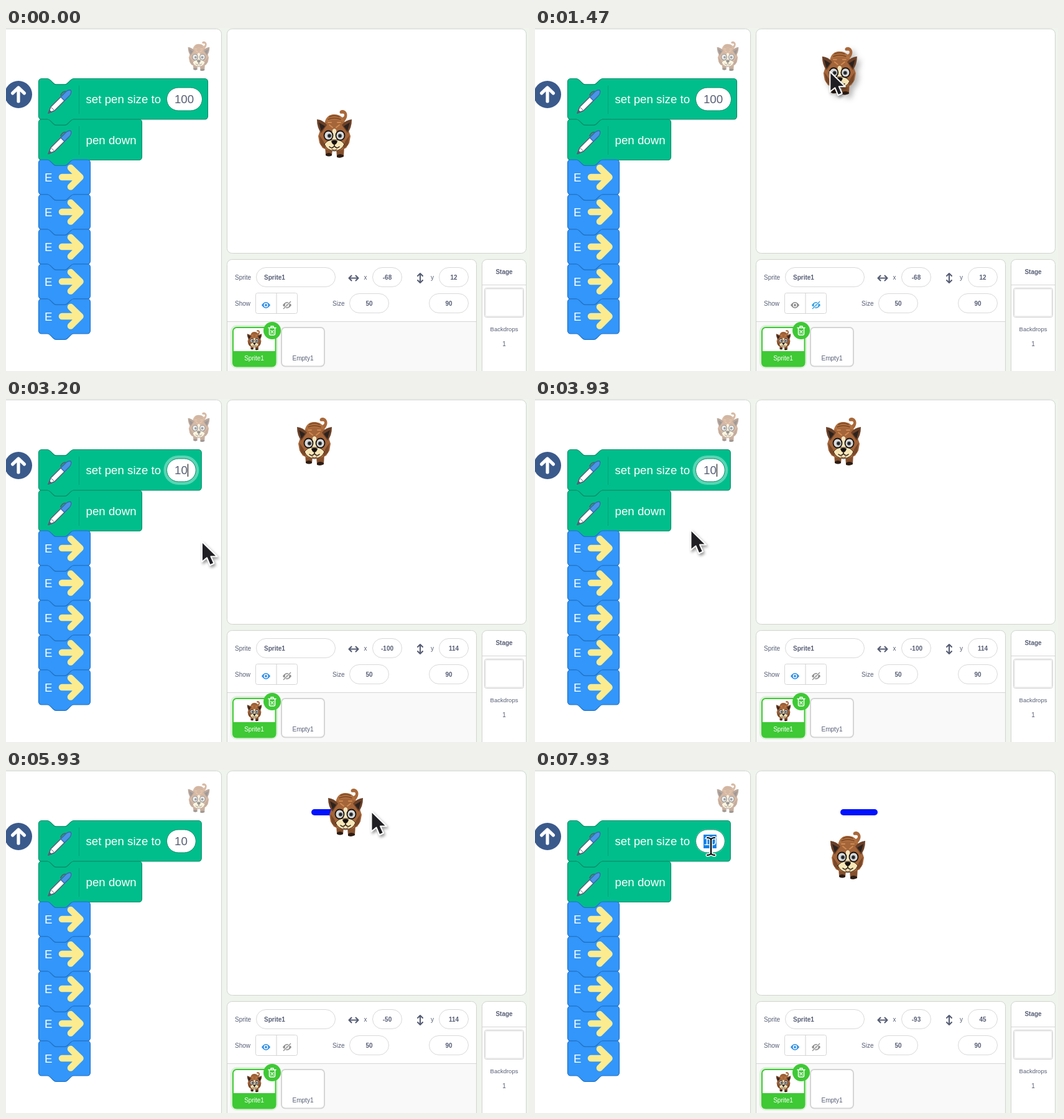
Write an HTML page that moves like this. It is 841 px wide and 552 px high and loops after 8000 ms.

```html
<!DOCTYPE html>
<html lang="en">
<head>
<meta charset="utf-8">
<title>Pen blocks</title>
<style>
  html, body { margin: 0; width: 100%; height: 100%; overflow: hidden; background: #eff4ec; }
  svg { display: block; width: 841px; height: 552px; font-family: "Liberation Sans", Arial, sans-serif; }
  .dragged { filter: drop-shadow(5px 5px 5px rgba(0, 0, 0, .3)); }
  .shade { filter: drop-shadow(2px 3px 2px rgba(0, 0, 0, .4)); }
</style>
</head>
<body>
<svg id="scene" viewBox="0 0 841 552" xmlns="http://www.w3.org/2000/svg"></svg>
<script>
const LOOP = 8000, TICK = 1000 / 15, S = 1.17;
const GREEN = ['#00be8c', '#0b8e69'], BLUE = ['#3296fa', '#2371c2'];
const INK = '#575e75';

// Cursor path: time, x, y
const cursorPath = [
  [130, 176, 14], [270, 290, 60], [400, 430, 135], [530, 512, 171], [670, 512, 171],
  [930, 441, 97], [1000, 433, 87], [1200, 446, 73], [1530, 480, 69], [1800, 480, 69],
  [1930, 317, 115], [2070, 306, 116], [2200, 292, 113], [2600, 292, 113],
  [2930, 331, 185], [3130, 326, 222], [3270, 303, 236], [3400, 300, 238],
  [3730, 272, 230], [3930, 250, 210], [4130, 196, 150], [4270, 190, 140], [4400, 188, 122],
  [4800, 188, 118], [5070, 175, 118], [5270, 176, 117], [5530, 400, 95], [5800, 608, 77],
  [5930, 587, 66], [6000, 587, 66], [6130, 544, 57], [6270, 543, 59], [6530, 521, 104],
  [6800, 506, 126], [7000, 501, 126], [7200, 501, 126], [7330, 411, 130],
  [7470, 330, 131], [7530, 281, 126], [7670, 280, 120], [7730, 283, 115], [7870, 283, 123]
];

const rect = (x, y, w, h, r, fill, stroke = 'none', more = '') =>
  `<rect x="${x}" y="${y}" width="${w}" height="${h}" rx="${r}" fill="${fill}" stroke="${stroke}" ${more}/>`;
const path = (d, fill = 'none', stroke = 'none', w = 1, more = '') =>
  `<path d="${d}" fill="${fill}" stroke="${stroke}" stroke-width="${w}" ${more}/>`;
const text = (x, y, s, size = 10, fill = INK, more = '') =>
  `<text x="${x}" y="${y}" font-size="${size}" fill="${fill}" ${more}>${s}</text>`;
const MID = 'text-anchor="middle"', BOLD = MID + ' font-weight="bold"';
const ROUND = 'stroke-linecap="round" stroke-linejoin="round"';

function blockShape(w, h) {
  w /= S; h /= S;
  return `M0 4A4 4 0 0 1 4 0H12c2 0 3 1 4 2l4 4c1 1 2 2 4 2h12c2 0 3-1 4-2l4-4c1-1 2-2 4-2
    H${w - 4}a4 4 0 0 1 4 4V${h - 4}a4 4 0 0 1-4 4H48c-2 0-3 1-4 2l-4 4c-1 1-2 2-4 2H24
    c-2 0-3-1-4-2l-4-4c-1-1-2-2-4-2H4a4 4 0 0 1-4-4Z`;
}

const block = (y, w, h, [fill, edge], id = '') =>
  `<path ${id} transform="translate(52.5 ${y}) scale(${S})" d="${blockShape(w, h)}" fill="${fill}" stroke="${edge}"/>`;

const penIcon = y => `<g transform="translate(67 ${y})" ${ROUND}>
  ${path('M21 9Q25 1 31 4M24 10l5-5', 'none', INK, 1.8)}
  ${path('M1 38L5 28L28 5L34 11L11 34Z', '#fff', INK, 1.5)}
  ${path('M21 12L30 3Q34 0 37 1Q39 4 36 9L27 18Z', '#4a94e8', '#3a6aa8', 1.4)}
  ${path('M1 38L3 33L6 36Z', INK, INK)}
  ${path('M6 29L10 33', 'none', INK, 1)}</g>`;

const penBlock = (y, w, label, id) => block(y, w, 65.5, GREEN, id) + penIcon(y + 17.5) +
  path(`M117.5 ${y + 11}v46`, 'none', '#06a67c', 1.2) + text(128.5, y + 39.5, label, 18.72, '#fff');

const stepBlock = y => block(y, 83, 56, BLUE) + text(62, y + 35, 'E', 18.72, '#fff') +
  path(`M90 ${y + 28}H119M104 ${y + 13}L119.5 ${y + 28}L104 ${y + 43.5}`, 'none', '#fcec8f', 10.5, ROUND);

const dog = `<g id="dog" stroke="#1c130d" stroke-width="1.8" ${ROUND}>
  ${path('M4-26C9-25 16-25 16-30C16-34 11-31 9-33C7-37 13-40 18-36C23-31 20-22 14-18Z', '#a9683a')}
  ${path('M-16-15C-14-29-6-31 0-31C9-31 16-26 18-14Z', '#b0703f')}
  ${path('M-8-27Q0-31 8-27M-10-23Q0-27 10-23', 'none', '#7a4525', 1.4)}
  ${path('M-15 20L-14 34Q-10 38-4 35L-3 24H3L4 37Q9 41 15 36L16 20Z', '#85502d')}
  ${path('M-14 33Q-9 29-4 33V35Q-9 38-14 35ZM4 35Q9 31 15 35V37Q9 40 4 38Z', '#2b1c14')}
  ${path('M-22-8C-16-20-8-22 0-22C9-22 17-20 22-8L26 4L24 15L19 23Q0 33-19 23L-24 15L-26 4Z', '#a4653a')}
  ${path('M-24 3L-22 18L-14 25L-17 13ZM24 3L22 18L14 25L17 13Z', '#794828', 'none')}
  ${path('M-28-23Q-18-22-12-14L-21-1Q-28-9-28-23Z', '#6b4027')}
  ${path('M28-23Q18-22 12-14L21-1Q28-9 28-23Z', '#6b4027')}
  ${path('M-25-18L-15-12L-21-4ZM25-18L15-12L21-4Z', '#2c221e', 'none')}
  ${path('M-8-14L-3-10M8-14L3-10M-10-18H-5M10-18H5', 'none', '#d08a50', 2)}
  ${path('M-3-6Q0-10 3-6L5 12H-5Z', '#f5e4bb', 'none')}
  ${path('M-16 17Q-11 9 0 10Q11 9 16 17Q12 27 0 28Q-12 27-16 17Z', '#f7e7b8', '#40291b', 1)}
  <ellipse cx="-9.5" cy="3" rx="7" ry="7.5" fill="#d9dcde"/>
  <ellipse cx="9.5" cy="3" rx="7" ry="7.5" fill="#d9dcde"/>
  <circle cx="-8" cy="3.5" r="3" fill="#202428" stroke="#777" stroke-width="1"/>
  <circle cx="9" cy="3.5" r="3" fill="#202428" stroke="#777" stroke-width="1"/>
  ${path('M-5 12Q0 9 5 12Q4 17 0 18Q-4 17-5 12Z', '#17110f')}
  ${path('M0 17V20M-8 21Q-4 25 0 20Q4 25 8 21', 'none', '#2b1c14', 1.5)}
  ${path('M-4 25Q0 28 4 25', 'none', '#7a4a35', 1.2)}</g>`;

const pill = (x, y, w, value, id = '') => rect(x + .5, y + .5, w - 1, 31, 15.5, '#fff', '#d9d9d9') +
  (value === null ? '' : text(x + w / 2, y + 20, value, 10, INK, BOLD + id));

const eye = (id, x, slash) => `<g id="${id}" transform="translate(${x} 446)">
  ${path('M-7 0Q0-10 7 0Q0 10-7 0Z', 'currentColor')}<circle r="3.4" fill="#fff"/><circle r="1.9" fill="currentColor"/>
  ${slash ? path('M-6 6L6-6', 'none', '#fff', 3) + path('M-6 6L6-6', 'none', 'currentColor', 1.3) : ''}</g>`;

const swapArrow = (x, y, turn) => `<g transform="translate(${x} ${y}) rotate(${turn})">
  ${path('M-7 0H7M-3.5-4L-7.5 0L-3.5 4M3.5-4L7.5 0L3.5 4', 'none', INK, 2.1, ROUND)}</g>`;

function scene() {
  const EDGE = '#cfd5cf';
  return `<defs>${dog}</defs>` + rect(0, 0, 841, 552, 0, '#eff4ec') +
    // code area
    rect(-20, 1.5, 366.5, 580, 8, '#fff', EDGE) +
    '<use href="#dog" transform="translate(310 45) scale(.62)" opacity=".45"/>' +
    '<circle cx="20" cy="107" r="22" fill="#3b5a8c"/>' +
    path('M20 118V97M10.500 105L20 96L29.500 105', 'none', '#fff', 5.2, ROUND) +
    penBlock(81.5, 272, 'set pen size to', 'id="sizeBlock"') +
    rect(258, 96, 57, 37, 18.5, '#fff', 'none', 'id="ring" fill-opacity=".35"') +
    rect(258.5, 96, 57, 37, 18.6, '#fff', '#0b8e69', 'id="field"') +
    rect(271, 104, 31, 22, 0, '#0f80e8', 'none', 'id="mark"') +
    text(286.5, 121, '', 18.72, INK, MID + ' id="size"') +
    path('M292.500 104.500V125', 'none', '#222', 1.2, 'id="caret"') +
    penBlock(147, 166, 'pen down', '') +
    [0, 1, 2, 3, 4].map(i => stepBlock(212 + 56 * i)).join('') +
    // stage
    rect(355.500, 1.5, 481, 361, 8, '#fff', EDGE) +
    path('', 'none', '#0012ff', 10, 'id="trail" stroke-linecap="round"') +
    '<g id="actor"><use href="#dog"/></g>' +
    // sprite details
    rect(355.500, 372.500, 401, 220, 8, '#fff', EDGE) +
    rect(356, 473, 400, 90, 0, '#f9f9f9') + path('M356 472.500H756', 'none', '#d6d6d6') +
    text(368, 405, 'Sprite') + pill(402, 385, 128, null) +
    text(415, 405, 'Sprite1', 10, INK, 'font-weight="bold"') +
    swapArrow(559, 402.5, 0) + text(575.500, 405, 'x') + pill(589, 385, 48, '', ' id="xValue"') +
    swapArrow(666, 402.5, 90) + text(683, 405, 'y') + pill(696, 385, 48, '', ' id="yValue"') +
    text(368, 447, 'Show') + rect(401.5, 426.5, 67, 33, 3, '#fff', '#d6d6d6') +
    path('M435 426.500V459.500', 'none', '#d0d0d0') + eye('shown', 418, false) + eye('hidden', 452, true) +
    text(525, 447, 'Size') + pill(552, 427, 64, '50') + pill(680, 427, 64, '90') +
    // sprite cards
    rect(361, 478, 76, 70, 10, '#dcefd8') + rect(365, 482, 68.500, 62.500, 6, '#fff', '#3ec935', 'stroke-width="2"') +
    path('M364.500 520H434V539Q434 545 428 545H370Q364.500 545 364.500 539Z', '#3ec935') +
    '<use href="#dog" transform="translate(399.500 502) scale(.42)"/>' + text(399, 535, 'Sprite1', 10, '#fff', MID) +
    rect(443, 482, 69, 62.500, 6, '#fff', '#d5d5d5', 'stroke-width="2"') + text(477.5, 535, 'Empty1', 10, INK, MID) +
    '<circle cx="428" cy="487" r="14" fill="#3ec935"/>' +
    path('M422 482.500H434M426 482V480H430V482M423.500 483.500V492Q423.500 494 425.500 494H430.500Q432.500 494 432.500 492V483.500M426 487l4 4m0-4l-4 4',
      'none', '#fff', 1.5, ROUND) +
    // backdrop panel
    rect(765.500, 372.500, 71, 220, 8, '#fff', EDGE) + path('M766 413.500H836', 'none', '#d6d6d6') +
    text(801, 396, 'Stage', 10, INK, BOLD) + rect(769.5, 418.5, 63, 47, 3, '#fff', '#d2d2d2') +
    rect(771, 420, 60, 44, 2, 'none', '#eee', 'stroke-width="2"') +
    text(801, 488, 'Backdrops', 9.5, INK, MID) + text(801, 512, '1', 10, INK, MID) +
    // pointers
    `<g id="arrow" class="shade">${path('M0.500 0.500V33L8.500 26.500L13.500 38.500L20 35.500L15 24.500H25Z', '#202024', '#fff', 2, ROUND)}</g>
    <g id="beam">${['#fff', '#000'].map((c, i) => path('M-6-14Q-1-14 0-11Q1-14 6-14M0-11V11M-6 14Q-1 14 0 11Q1 14 6 14',
      'none', c, i ? 2.2 : 5, ROUND)).join('')}</g>`;
}

document.getElementById('scene').innerHTML = scene();
const el = {};
document.querySelectorAll('#scene [id]').forEach(n => el[n.id] = n);

const clamp = v => Math.max(0, Math.min(1, v));
const ease = v => v * v * (3 - 2 * v);
const move = (node, x, y) => node.setAttribute('transform', `translate(${x} ${y})`);
const show = (node, on) => node.setAttribute('visibility', on ? 'visible' : 'hidden');
const within = (t, a, b) => t >= a && t < b;

function along(points, t) {
  const i = points.findIndex(p => p[0] > t);
  if (i < 0) return points[points.length - 1].slice(1);
  if (i === 0) return points[0].slice(1);
  const [ta, xa, ya] = points[i - 1], [tb, xb, yb] = points[i];
  const k = (t - ta) / (tb - ta);
  return [xa + (xb - xa) * k, ya + (yb - ya) * k];
}

// Sprite position in stage units, with y upwards
function restPosition(t) {
  if (t < 1730) return [-68, 12];
  if (t < 7200) return [-100 + 10 * Math.max(0, Math.min(5, Math.floor((t - 5130) / 66))), 114];
  return [-93, 45];
}

function render(time) {
  const t = Math.round(Math.floor((time + 5) / TICK) * TICK / 10) * 10;
  const [cx, cy] = along(cursorPath, t);

  const firstDrag = within(t, 730, 1730), dragging = firstDrag || within(t, 6270, 7200);
  const [px, py] = restPosition(t);
  const x = dragging ? cx + (firstDrag ? 16 : 2) : 596 + px;
  const y = dragging ? cy + (firstDrag ? -1 : 11) : 182 - py;
  move(el.actor, x, y);
  el.actor.setAttribute('class', dragging ? 'dragged' : '');
  const shownX = within(t, 6270, 7200) ? -50 : px;
  el.xValue.textContent = shownX;
  el.yValue.textContent = py;
  el.shown.setAttribute('color', dragging ? '#8a8a8a' : '#2e8de8');
  el.hidden.setAttribute('color', dragging ? '#2e9be0' : '#8a8a8a');

  show(el.trail, t >= 5130);
  el.trail.setAttribute('d', `M496 68H${t < 6270 ? 596 + px : 546}`);

  const value = t < 2670 ? '100' : t < 2800 ? '1' : '10';
  const width = value === '100' ? 57 : 46.8, mid = 258.5 + width / 2;
  const selected = within(t, 2470, 2670) || t >= 7870;
  const focusAt = t >= 7870 ? 7870 : 2470;
  const focused = within(t, 2470, 5070) || t >= 7870;
  const grow = focused ? 5 * ease(clamp((t - focusAt) / 220)) : 0;
  el.sizeBlock.setAttribute('d', blockShape(215 + width, 65.5));
  el.field.setAttribute('width', width);
  const ring = { x: 258.5 - grow, y: 96 - grow, width: width + 2 * grow, height: 37 + 2 * grow, rx: 18.5 + grow };
  for (const key in ring) el.ring.setAttribute(key, ring[key]);
  el.size.textContent = value;
  el.size.setAttribute('x', mid - .5);
  el.size.setAttribute('fill', selected ? '#fff' : INK);
  const markWidth = 10.4 * value.length;
  el.mark.setAttribute('x', mid - .5 - markWidth / 2);
  el.mark.setAttribute('width', markWidth);
  show(el.mark, selected);
  show(el.caret, within(t, 2800, 5070) && Math.floor((t - 2800) / 500) % 2 === 0);

  const beam = within(t, 2200, 2670) || t >= 7730;
  show(el.beam, beam);
  show(el.arrow, !beam && t >= 130);
  move(el.beam, cx, cy);
  move(el.arrow, cx, cy);
}

const start = performance.now();
function loop(now) {
  render(Math.max(0, now - start) % LOOP);
  requestAnimationFrame(loop);
}
render(0);
requestAnimationFrame(loop);
</script>
</body>
</html>
```
